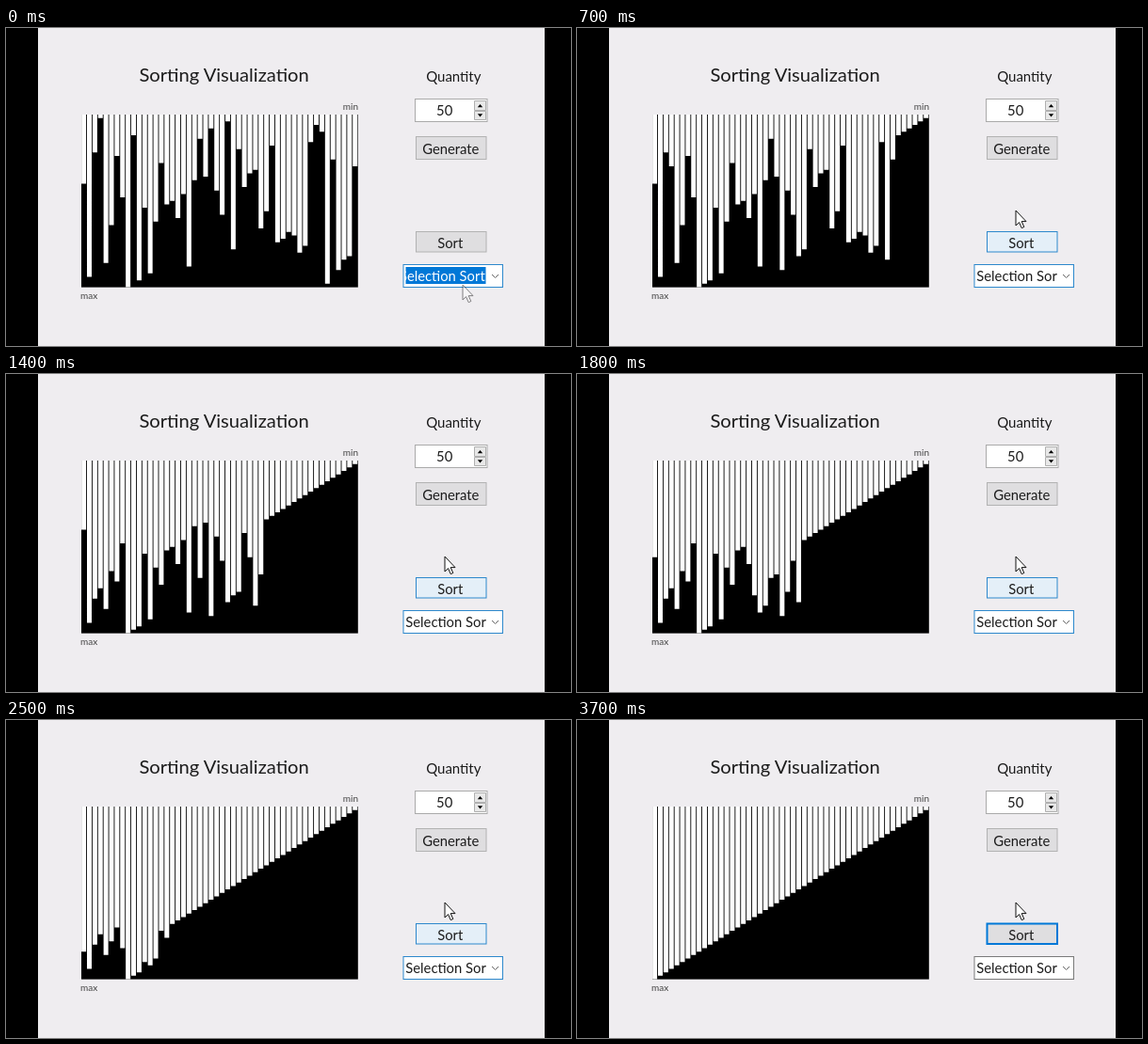
An HTML page for the animation above (3.8 s loop, 600 px wide and 338 px high).

```html
<!DOCTYPE html>
<html lang="en">
<head>
<meta charset="utf-8">
<title>Sorting Visualization</title>
<style>
  html, body { margin: 0; width: 100%; height: 100%; overflow: hidden; background: #000; }
  svg { display: block; width: 100%; height: 100%; }
  text { font: 14.8px Lato, "Open Sans", sans-serif; fill: #1c1c1c; text-anchor: middle; }
  .title { font-size: 20.15px; }
  .small { font-size: 10px; fill: #444; }
  .box { fill: #fff; stroke: #aaa; }
  .button { fill: #dfdee0; stroke: #b2b2b2; }
  .step { fill: #e8e8e8; stroke: #b0b0b0; }
</style>
</head>
<body>
<svg viewBox="0 0 600 338">
  <clipPath id="field"><rect x="423.5" y="252" width="86.5" height="23"/></clipPath>
  <rect width="600" height="338"/>
  <rect x="34" width="538" height="338" fill="#efedf0"/>

  <text class="title" x="231.6" y="57">Sorting Visualization</text>
  <text class="small" x="374" y="86.5" style="text-anchor:end">min</text>
  <text class="small" x="79" y="288" style="text-anchor:start">max</text>
  <rect x="80" y="92" width="293.8" height="183.6"/>
  <path id="bars" fill="#fff"/>

  <text x="475.3" y="57" style="font-size:15px">Quantity</text>
  <rect class="box" x="434.5" y="75.5" width="76.5" height="24"/>
  <text x="465.7" y="92.6">50</text>
  <path class="step" d="M497.5 77.5h12v10h-12zM497.5 88.5h12v9h-12z"/>
  <path d="M500.8 84.2l2.7-3.2 2.7 3.2zM500.8 91.3l2.7 3.2 2.7-3.2z"/>

  <rect class="button" x="435.5" y="115.5" width="74.5" height="24"/>
  <text x="472.3" y="133.5">Generate</text>

  <rect id="sort" x="435.5" y="216.5" width="74.5" height="21.5"/>
  <text x="471.7" y="233.5">Sort</text>

  <rect id="combo" class="box" x="422" y="251.5" width="105.5" height="24"/>
  <rect id="mark" x="424.5" y="254" width="85" height="18" fill="#0078d7"/>
  <g clip-path="url(#field)"><text id="choice" y="268.6">Selection Sort</text></g>
  <path d="M516 262l3.5 3.5 3.5-3.5" fill="none" stroke="#666"/>

  <path id="cursor" d="M0 0V16L3.6 12.6 6.2 18.6 8.8 17.5 6.2 11.6H11Z" fill="#fff" stroke="#111"/>
</svg>
<script>
const LOOP = 3800, TICK = 100, COUNT = 50;
const START = 250, RATE = 0.0152; // swaps per ms
const LEFT = 80.1, TOP = 92, PITCH = 5.88, WIDTH = 5, UNIT = 3.67;
const BLUE = '#2d88cc', FOCUS = '#0078d7';
const values = [
  20, 47, 11, 1, 43, 32, 12, 24, 50, 6, 48, 27, 46, 31, 14, 26, 25,
  30, 23, 44, 19, 7, 18, 4, 22, 29, 2, 39, 10, 21, 17, 16, 33, 28,
  9, 37, 36, 34, 35, 40, 38, 8, 3, 5, 49, 13, 45, 42, 41, 15
];
const path = [[0, 485, 273], [200, 475, 228], [450, 475, 228], [700, 466, 194], [LOOP, 466, 194]];

const el = id => document.getElementById(id);
const set = (id, attrs) => {
  for (const name in attrs) el(id).style.setProperty(name, attrs[name]);
};
const clamp = (x, lo, hi) => Math.min(hi, Math.max(lo, x));

// Selection sort, moving the smallest remaining value to the right end.
function sorted(swaps) {
  const a = values.slice();
  for (let n = 0; n < swaps; n++) {
    const end = COUNT - 1 - n;
    const min = a.indexOf(Math.min(...a.slice(0, end + 1)));
    [a[min], a[end]] = [a[end], a[min]];
  }
  return a;
}

function pointer(t) {
  const i = path.findIndex(p => p[0] > t);
  const [t0, x0, y0] = path[i - 1], [t1, x1, y1] = path[i];
  const k = (t - t0) / (t1 - t0), s = k * k * (3 - 2 * k);
  return [x0 + (x1 - x0) * s, y0 + (y1 - y0) * s];
}

function mix(from, to, k) {
  return `rgb(${from.map((c, i) => Math.round(c + (to[i] - c) * k))})`;
}

function draw(t) {
  const swaps = clamp(Math.floor((t - START) * RATE), 0, COUNT);
  el('bars').setAttribute('d', sorted(swaps).map((v, i) =>
    `M${LEFT + i * PITCH} ${TOP}h${WIDTH}v${v * UNIT}h${-WIDTH}z`).join(''));

  const hover = t >= 200, done = t >= 3500;
  const fade = clamp((t - 3500) / 200, 0, 1);
  set('sort', {
    fill: hover ? mix([228, 239, 248], [223, 222, 224], fade) : '#dfdee0',
    stroke: done ? FOCUS : hover ? BLUE : '#b2b2b2',
    'stroke-width': 1 + fade
  });

  const selected = t < 100;
  set('combo', { stroke: done ? '#7a7a7a' : BLUE });
  set('mark', { display: selected ? 'inline' : 'none' });
  set('choice', { fill: selected ? '#fff' : '#1c1c1c', 'text-anchor': selected ? 'end' : 'start' });
  el('choice').setAttribute('x', selected ? 508.7 : 424.3);

  el('cursor').setAttribute('transform', `translate(${pointer(t)})`);
  set('cursor', { opacity: selected ? 0.5 : 1 });
}

function frame() {
  const t = performance.now() % LOOP;
  draw(Math.floor(t / TICK) * TICK);
  requestAnimationFrame(frame);
}
frame();
</script>
</body>
</html>
```
